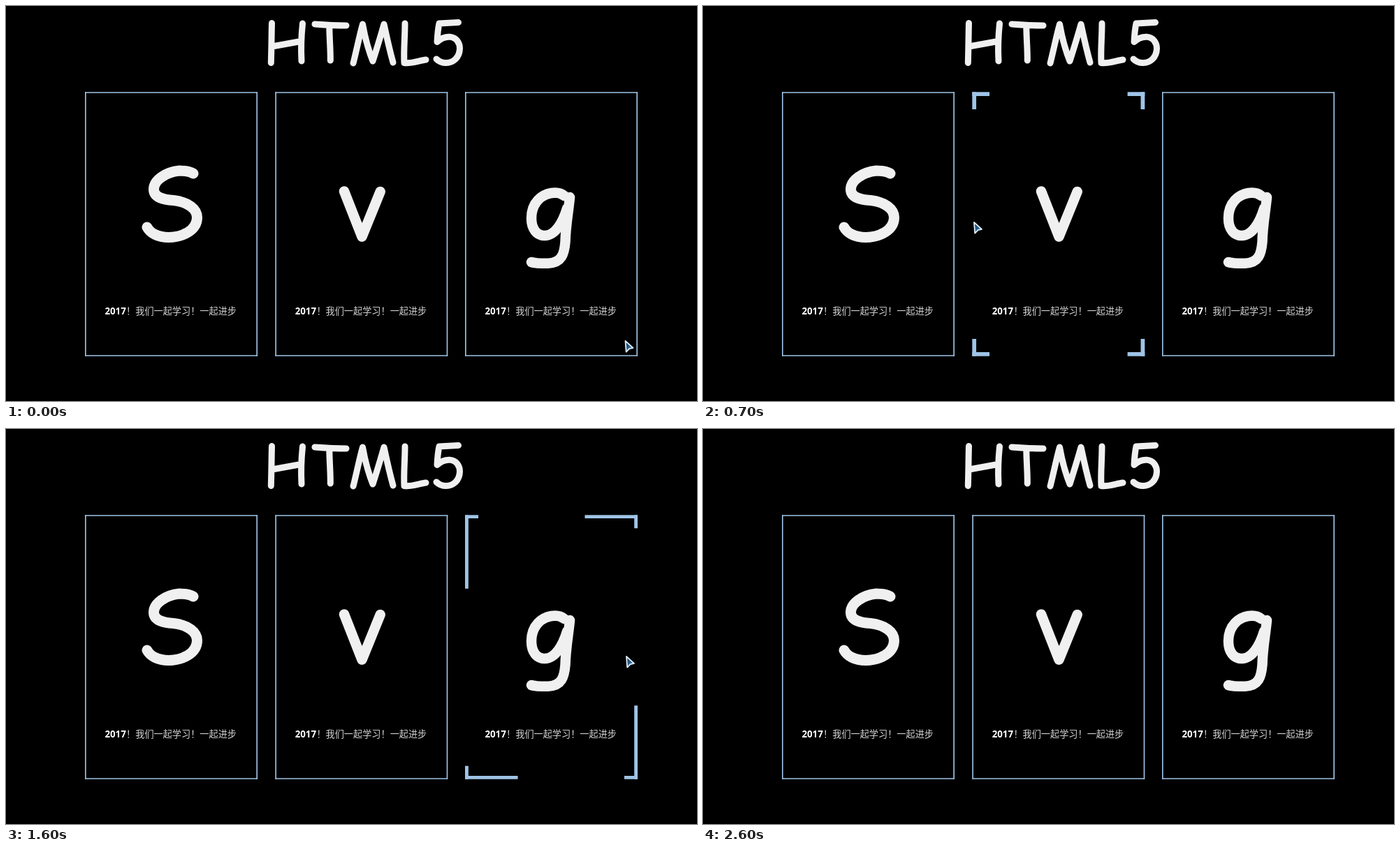
Animation of 989 by 566 pixels, one loop 2.8 s. Source, as an HTML page:

```html
<!DOCTYPE html>
<html lang="zh-CN">
<head>
<meta charset="utf-8">
<title>HTML5 SVG</title>
<style>
  html, body { margin: 0; width: 100%; height: 100%; overflow: hidden; background: #000; }
  #stage { display: block; width: 989px; height: 566px; }
  .pen { fill: none; stroke: #f0f0f0; stroke-linecap: round; stroke-linejoin: round; }
  .edge line { stroke: #9fc4e6; }
  .year { font: 700 13.3px "Open Sans", sans-serif; fill: #fff; }
  .note { font: 100 13.17px "Noto Sans CJK SC", "Noto Sans CJK", sans-serif; fill: #d4d4d4; }
</style>
</head>
<body>
<svg id="stage" viewBox="0 0 989 566" xmlns="http://www.w3.org/2000/svg">
  <defs>
    <linearGradient id="steel" x1="0" y1="0" x2="1" y2="1">
      <stop offset="0" stop-color="#12304c"/>
      <stop offset="0.5" stop-color="#2c5f8c"/>
      <stop offset="1" stop-color="#6fb0dc"/>
    </linearGradient>
  </defs>
  <rect width="989" height="566" fill="#000"/>
  <g class="pen" stroke-width="9" role="img" aria-label="HTML5">
    <path d="M380.5 24.5C380 42 380 60 379.3 81.5M424.5 25C422.5 45 422 62 423 79M381 58L422 50.5"/>
    <path d="M442 26C455 27 472 28 487 28M462.8 30C463 48 464.5 62 464.3 78"/>
    <path d="M497 82C502 62 506 42 510.5 26C514 46 519 64 525 79C531 60 536 44 541 26C545 45 549 63 554 81"/>
    <path d="M571 25C571 45 569 63 570 81.5C580 83 592 78 601 77"/>
    <path d="M647.5 23.5L620 25C618 34 617.5 42 617 51.5C623 46 629 44 635 44.3C645 45 649.5 53 649.5 61C649 74 640 81.5 630 81.5C624 81.5 619 79 616 76"/>
  </g>
  <g class="pen" stroke-width="15">
    <path aria-label="S" d="M268 240C262 236.5 255 236 248 236C228 238 211.5 250 211.5 262.5C211.5 275 226 277.5 240 278.5C261 281 273.5 291 273.5 303C273.5 321 253 331.5 233 331.5C217 331.5 206 325 202 317"/>
    <path aria-label="v" stroke-width="14.5" d="M484 265.5L509.5 330.5L535.7 266"/>
    <path aria-label="g" stroke-width="14.5" d="M799 272C795 268.5 791 267.5 786 267.5C766 268 752 283 752 304C752 320 760 329 771 329C786 329 797 310 803 290M807 274C805 295 801 315 800.5 338C799 356 795 368 776 368.7C766 369 758 369 752 367"/>
  </g>
  <g id="cards"></g>
  <path id="arrow" d="M0 0L11 9.8L5.6 11.2L1.2 15.6Z" fill="url(#steel)" stroke="#dceffa" stroke-width="1.8" stroke-linejoin="round"/>
</svg>
<script>
const NS = "http://www.w3.org/2000/svg";
const LOOP = 2800, STEP = 100, LAST = 2600, DUR = 270;
const W = 300, H = 460;

// hover spans per card: [enter, leave]
const cards = [
  { x: 113, spans: [[812, 1264], [1936.4, 2325]] },
  { x: 385.3, spans: [[426, 700], [1264, 1400]] },
  { x: 657, spans: [[0, 391.6], [1473, 1853]] }
];

// pointer stops: time, x, y
const stops = [
  [0, 886.5, 480], [200, 850, 440], [400, 648, 350], [500, 422, 313.3], [700, 388, 310],
  [800, 350, 306], [1000, 180.5, 303], [1200, 190, 306], [1300, 450, 318],
  [1400, 697.5, 329], [1600, 888, 326], [1800, 872, 324], [1900, 500, 312],
  [2000, 174, 303], [2300, 174, 303]
];

function make(tag, attrs, parent, text) {
  const el = document.createElementNS(NS, tag);
  for (const k in attrs) el.setAttribute(k, attrs[k]);
  if (text) el.textContent = text;
  parent.appendChild(el);
  return el;
}

// cubic-bezier(.25, .1, .25, 1)
function ease(x) {
  if (x <= 0) return 0;
  if (x >= 1) return 1;
  let lo = 0, hi = 1, s = 0.5;
  for (let i = 0; i < 24; i++) {
    s = (lo + hi) / 2;
    const bx = 0.75 * s * (1 - s) + s * s * s;
    if (bx < x) lo = s; else hi = s;
  }
  const r = 1 - s;
  return 0.3 * r * r * s + 3 * r * s * s + s * s * s;
}

function hover(spans, t) {
  let p = 0;
  for (const [enter, leave] of spans) {
    if (t < enter) break;
    if (t < leave) return ease((t - enter) / DUR);
    const peak = ease((leave - enter) / DUR);
    p = peak * (1 - ease((t - leave) / (DUR * peak)));
  }
  return p < 0.004 ? 0 : p;
}

const layer = document.getElementById("cards");
const arrow = document.getElementById("arrow");

for (const card of cards) {
  const box = make("svg", {
    class: "edge", x: card.x, y: 123.2, width: 247, height: 378.6,
    viewBox: `0 0 ${W} ${H}`, preserveAspectRatio: "none", overflow: "hidden"
  }, layer);
  const side = (x1, y1, x2, y2, dx, dy) =>
    ({ el: make("line", { x1, y1, x2, y2 }, box), dx, dy });
  card.sides = [
    side(0, 0, 3 * W, 0, -W, 0),
    side(0, H, 0, -2 * H, 0, H),
    side(W, H, -2 * W, H, W, 0),
    side(W, 0, W, 3 * H, 0, -H)
  ];
  const left = card.x + 28.4;
  make("text", { class: "year", x: left, y: 441.7 }, layer, "2017");
  make("text", { class: "note", x: left + 30.7, y: 441.5 }, layer, "！我们一起学习！一起进步");
}

function drawCard(card, t) {
  const p = hover(card.spans, t);
  for (const { el, dx, dy } of card.sides) {
    const [dash, gap] = dx ? [330, 240] : [490, 400];
    el.setAttribute("stroke-width", 4 + 10 * p);
    el.setAttribute("stroke-dasharray", p ? `${dash * p} ${gap * p}` : "none");
    el.setAttribute("transform", `translate(${dx * p} ${dy * p})`);
  }
}

function drawArrow(t) {
  const i = stops.findIndex(s => s[0] >= t);
  arrow.style.display = i < 0 ? "none" : "";
  if (i < 0) return;
  const b = stops[i], a = stops[Math.max(0, i - 1)];
  const k = b[0] > a[0] ? (t - a[0]) / (b[0] - a[0]) : 0;
  const at = n => a[n] + (b[n] - a[n]) * k;
  arrow.setAttribute("transform", `translate(${at(1)} ${at(2)})`);
}

function draw(ms) {
  const t = Math.min(LAST, Math.floor((ms % LOOP) / STEP) * STEP);
  for (const card of cards) drawCard(card, t);
  drawArrow(t);
}

let start = null;
function tick(now) {
  if (start === null) start = now;
  draw(Math.max(0, now - start));
  requestAnimationFrame(tick);
}
draw(0);
requestAnimationFrame(tick);
</script>
</body>
</html>
```
